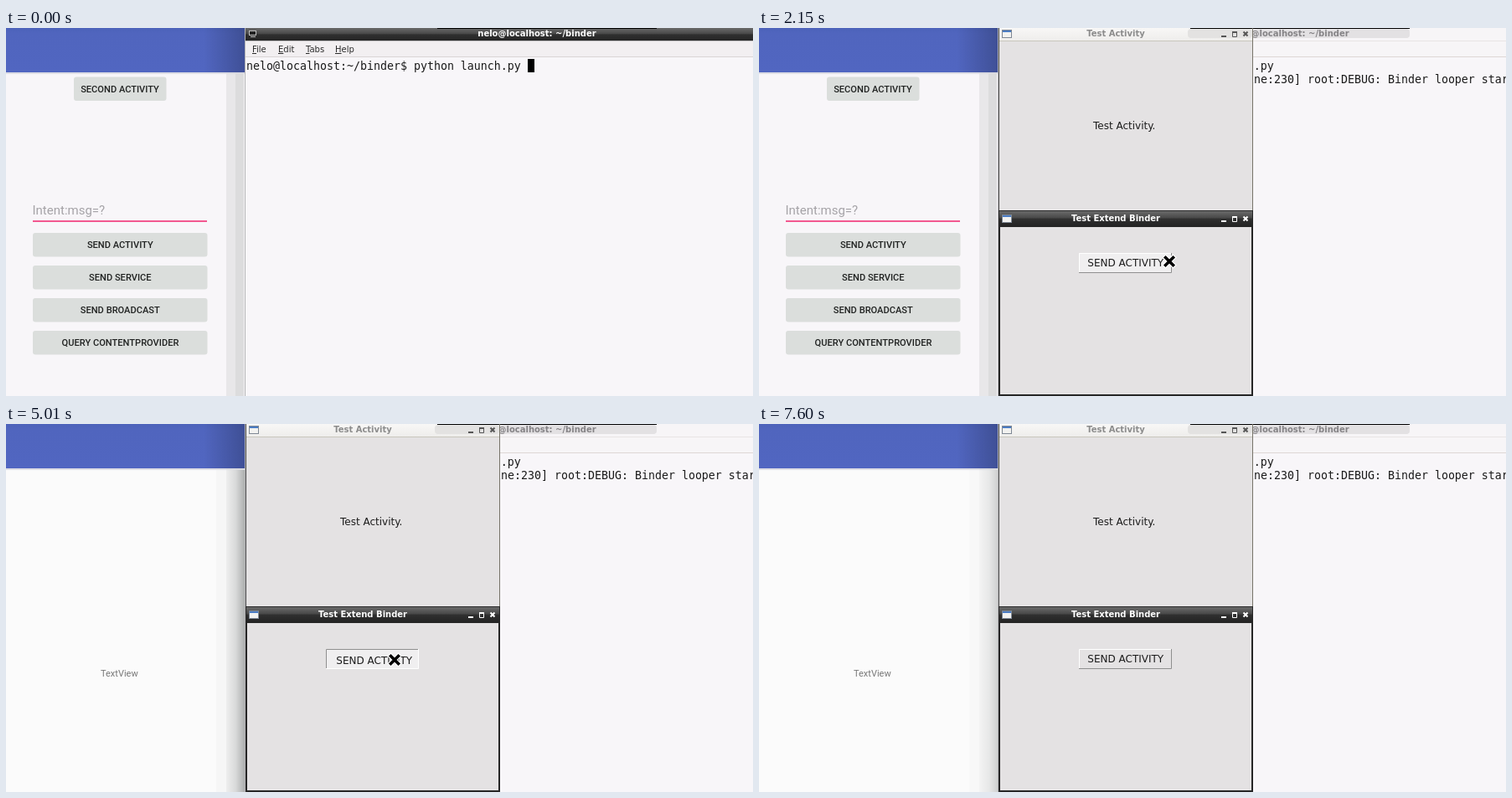
These frames come from a looping animation (892x440 px, 7700 ms). An HTML page:

```html
<!DOCTYPE html>
<html lang="en">
<head>
<meta charset="utf-8">
<title>Binder demo</title>
<style>
html, body { margin: 0; width: 100%; height: 100%; overflow: hidden; background: #f8f6f9; }
svg { display: block; width: 892px; height: 440px; }
text { white-space: pre; }
.ui { font: 12px "DejaVu Sans", sans-serif; fill: #1c1c1c; }
.menu { font: 10px "DejaVu Sans", sans-serif; fill: #2a2a2a; }
.title { font: bold 10px "DejaVu Sans", sans-serif; text-anchor: middle; }
.mono { font: 13.29px "DejaVu Sans Mono", monospace; fill: #1a1a1a; }
.app { font: 500 11.1px Roboto, sans-serif; fill: #202221; text-anchor: middle; }
.hint { font: 15px Roboto, sans-serif; fill: #a5a3a7; }
.view { font: 11px Roboto, sans-serif; fill: #777; }
.mono tspan, .menu tspan { text-decoration: underline; }

/* hard cuts on one shared clock */
.cut { animation: 7700ms step-end infinite; }
#typed { animation-name: typed; }
#entered { animation-name: entered; }
#windows { animation-name: windows; }
#caret { animation-name: caret; }
#second { animation-name: second; }
#label { animation-name: label; }
#soft { animation-name: soft; }
#idle { animation-name: idle; }
#hover { animation-name: hover; }
#pressed { animation-name: pressed; }
#mouse { animation-name: mouse; }

@keyframes typed { 0% { opacity: 1 } 4.67%, 100% { opacity: 0 } }
@keyframes entered { 0% { opacity: 0 } 4.67%, 100% { opacity: 1 } }
@keyframes windows { 0% { opacity: 0 } 7.01%, 100% { opacity: 1 } }
@keyframes caret {
  0%, 11.68%, 25.58%, 39.48%, 100% { opacity: 0 }
  4.67%, 18.7%, 32.46% { opacity: 1 }
}
@keyframes second { 0% { opacity: 0 } 44.15% { opacity: .6 } 46.36%, 100% { opacity: 1 } }
@keyframes label { 0% { transform: translateY(8px) } 46.36%, 100% { transform: none } }
@keyframes soft { 0% { opacity: 1 } 98.7%, 100% { opacity: .55 } }
@keyframes idle { 0%, 85.97%, 100% { opacity: 1 } 27.92% { opacity: 0 } }
@keyframes hover {
  0%, 41.81%, 85.97%, 100% { opacity: 0 }
  27.92%, 67.4% { opacity: 1 }
}
@keyframes pressed { 0%, 67.4%, 100% { opacity: 0 } 41.81% { opacity: 1 } }
@keyframes mouse {
  0% { transform: translate(734px, 302px); opacity: 0 }
  21.03% { transform: translate(734px, 302px); opacity: 1 }
  23.24% { transform: translate(660px, 283px); opacity: 1 }
  25.58% { transform: translate(545px, 281px); opacity: 1 }
  27.92% { transform: translate(490px, 279px); opacity: 1 }
  30.25% { transform: translate(489px, 279px); opacity: 1 }
  32.46% { transform: translate(484px, 280px); opacity: 1 }
  34.8% { transform: translate(476px, 281px); opacity: 1 }
  37.14% { transform: translate(468px, 282px); opacity: 1 }
  39.48% { transform: translate(464px, 282px); opacity: 1 }
  83.63% { transform: translate(510px, 295px); opacity: 1 }
  85.97% { transform: translate(585px, 322px); opacity: 1 }
  88.31% { transform: translate(665px, 352px); opacity: 1 }
  90.51% { transform: translate(752px, 394px); opacity: 1 }
  92.85% { transform: translate(838px, 432px); opacity: 1 }
  95.19%, 100% { transform: translate(838px, 432px); opacity: 0 }
}
</style>
</head>
<body>
<svg viewBox="0 0 892 440" xmlns="http://www.w3.org/2000/svg">
  <defs>
    <linearGradient id="dark" x2="0" y2="1">
      <stop offset="0" stop-color="#6a6a6a"/><stop offset=".45" stop-color="#484848"/>
      <stop offset=".5" stop-color="#303030"/><stop offset="1" stop-color="#242424"/>
    </linearGradient>
    <linearGradient id="pale" x2="0" y2="1">
      <stop offset="0" stop-color="#f8f7f6"/><stop offset="1" stop-color="#eeedeb"/>
    </linearGradient>
    <linearGradient id="bar" x2="0" y2="1">
      <stop offset="0" stop-color="#4c62ba"/><stop offset=".12" stop-color="#5065be"/>
      <stop offset="1" stop-color="#5166c1"/>
    </linearGradient>
    <linearGradient id="barShade">
      <stop offset="0" stop-color="#000" stop-opacity="0"/><stop offset="1" stop-color="#000" stop-opacity=".22"/>
    </linearGradient>
    <linearGradient id="edge">
      <stop offset="0" stop-color="#eeeeee"/><stop offset=".5" stop-color="#d8d9d9"/>
      <stop offset="1" stop-color="#a9abab"/>
    </linearGradient>
    <g id="controls" fill="none" stroke="currentColor">
      <path d="M552 10h6" stroke-width="2"/>
      <path d="M565.5 5v5.5h5V5z" stroke-width="1"/><path d="M565 5h6" stroke-width="2"/>
      <path d="M578.5 4.5l5 5m0-5l-5 5" stroke-width="2"/>
    </g>
    <g id="icon">
      <rect x="290.5" y="2.5" width="11" height="9" fill="#f2f2f0" stroke="#7f8894"/>
      <path d="M291 4h10" stroke="#4a7cc4" stroke-width="2"/>
    </g>
    <rect id="wide" x="32" width="208.5" height="28.5" rx="3" fill="#dbdedc"/>
    <g id="raised">
      <path d="M382.5 292V269.5H492" fill="none" stroke="#fff"/>
      <path d="M382 292.5H492.5V269" fill="none" stroke="#8f8f8f"/>
    </g>
  </defs>

  <!-- terminal -->
  <rect x="286" width="606" height="440" fill="#f8f6f9"/>
  <rect x="286" width="606" height="15.5" fill="url(#dark)"/>
  <rect x="286" y="15.5" width="606" height="19.5" fill="#f2eff1"/>
  <path d="M286 34.5h606" stroke="#d9d4d5"/>
  <g fill="none" stroke="#c4c4c4"><rect x="290.5" y="3.5" width="8" height="5" fill="#222"/><path d="M292 10.5h6"/></g>
  <text class="title" x="634" y="10" fill="#fff">nelo@localhost: ~/binder</text>
  <path d="M515 .5h262" stroke="#000"/>
  <text class="menu" y="29"><tspan x="294">F</tspan>ile</text>
  <text class="menu" y="29"><tspan x="325">E</tspan>dit</text>
  <text class="menu" y="29"><tspan x="358">T</tspan>abs</text>
  <text class="menu" y="29"><tspan x="393">H</tspan>elp</text>
  <text class="mono" x="287" y="50">nelo@localhost:~/binder$ python launch.py</text>
  <rect id="typed" class="cut" x="623" y="37" width="8" height="16" fill="#000"/>
  <rect id="entered" class="cut" x="287" y="53" width="8" height="16" fill="#000"/>

  <!-- phone, first screen -->
  <rect width="286" height="440" fill="#f8f6f9"/>
  <rect x="263" y="53" width="11" height="387" fill="#e8e7e9"/>
  <rect x="274" y="53" width="10" height="387" fill="#dcdcdd"/>
  <rect width="286" height="53" fill="url(#bar)"/>
  <rect x="236" width="50" height="53" fill="url(#barShade)"/>
  <rect y="53" width="286" height="2" fill="#d9d9e0" opacity=".8"/>
  <rect x="81" y="58.5" width="110.5" height="28.5" rx="3" fill="#dbdedc"/>
  <use href="#wide" y="245"/><use href="#wide" y="284"/>
  <use href="#wide" y="323"/><use href="#wide" y="362"/>
  <g class="app">
    <text x="136" y="77">SECOND ACTIVITY</text>
    <text x="136.3" y="263">SEND ACTIVITY</text>
    <text x="136.3" y="302">SEND SERVICE</text>
    <text x="136.3" y="341">SEND BROADCAST</text>
    <text x="136.5" y="380">QUERY CONTENTPROVIDER</text>
  </g>
  <text class="hint" x="31.5" y="223">Intent:msg=?</text>
  <rect x="32" y="230" width="208" height="2" fill="#f2578f"/>
  <rect id="caret" class="cut" x="32" y="207" width="2" height="21" fill="#ee4f88"/>

  <!-- phone, second screen -->
  <g id="second" class="cut">
    <rect y="55" width="286" height="385" fill="#fbfbfb"/>
    <g id="soft" class="cut">
      <rect x="251" y="55" width="13" height="385" fill="#f6f6f6"/>
      <rect x="263" y="55" width="23" height="385" fill="url(#edge)"/>
    </g>
    <text id="label" class="view cut" x="113" y="302">TextView</text>
  </g>
  <path d="M285.5 0v440" stroke="#b4b4b6"/>

  <g id="windows" class="cut">
    <!-- terminal loses focus -->
    <rect x="590" width="302" height="35" fill="#f7f5f7"/>
    <path d="M590 15.5h302" stroke="#e9e5e4"/>
    <path d="M590 34.5h302" stroke="#ddd7d5"/>
    <rect x="590" y="1" width="187" height="11" rx="4" fill="#e3e1e3"/>
    <path d="M515 .5h262" stroke="#000"/>
    <text class="title" x="634" y="10" fill="#858386">nelo@localhost: ~/binder</text>
    <text class="mono" x="575" y="66">line:230] root:DEBUG: Binder looper started</text>

    <!-- inactive window -->
    <rect x="286" width="304" height="219" fill="#e4e2e3"/>
    <rect x="287" width="302" height="15.5" fill="url(#pale)"/>
    <rect x="512" y="1" width="77" height="11" rx="4" fill="#e3e2e1"/>
    <path d="M515 .5h75" stroke="#000"/>
    <path d="M287 15.5h302" stroke="#c9c6bd"/>
    <path d="M286.5 0v219" stroke="#4c4c4c"/>
    <path d="M589.5 0v219" stroke="#77746a"/>
    <use href="#icon"/>
    <text class="title" x="426" y="10" fill="#8c8c8c">Test Activity</text>
    <use href="#controls" color="#555"/>
    <text class="ui" x="399" y="121">Test Activity.</text>

    <!-- active window -->
    <rect x="286" y="218" width="304" height="222" fill="#262626"/>
    <rect x="287" y="219" width="302" height="18" fill="url(#dark)"/>
    <rect x="288" y="238" width="300" height="200" fill="#e4e2e3"/>
    <use href="#icon" y="221"/>
    <text class="title" x="426" y="231" fill="#fff">Test Extend Binder</text>
    <use href="#controls" y="221" color="#fff"/>

    <g id="idle" class="cut">
      <use href="#raised"/>
      <text class="ui" x="392.3" y="285">SEND ACTIVITY</text>
    </g>
    <g id="hover" class="cut">
      <rect x="382" y="269" width="111" height="24" fill="#f0eff0"/>
      <use href="#raised"/>
      <text class="ui" x="392.3" y="285">SEND ACTIVITY</text>
    </g>
    <g id="pressed" class="cut">
      <rect x="382" y="269" width="111" height="24" fill="#f0eff0"/>
      <path d="M382.5 292V269.5H492" fill="none" stroke="#8f8f8f"/>
      <path d="M382 292.5H492.5V269" fill="none" stroke="#fff"/>
      <text class="ui" x="394.3" y="287">SEND ACTIVITY</text>
    </g>
  </g>

  <g id="mouse" class="cut" fill="none" stroke-linecap="square">
    <path d="M-4.5-4.5l9 9m0-9l-9 9" stroke="#fff" stroke-width="6"/>
    <path d="M-4.5-4.5l9 9m0-9l-9 9" stroke="#000" stroke-width="3.6"/>
  </g>
</svg>
</body>
</html>
```
